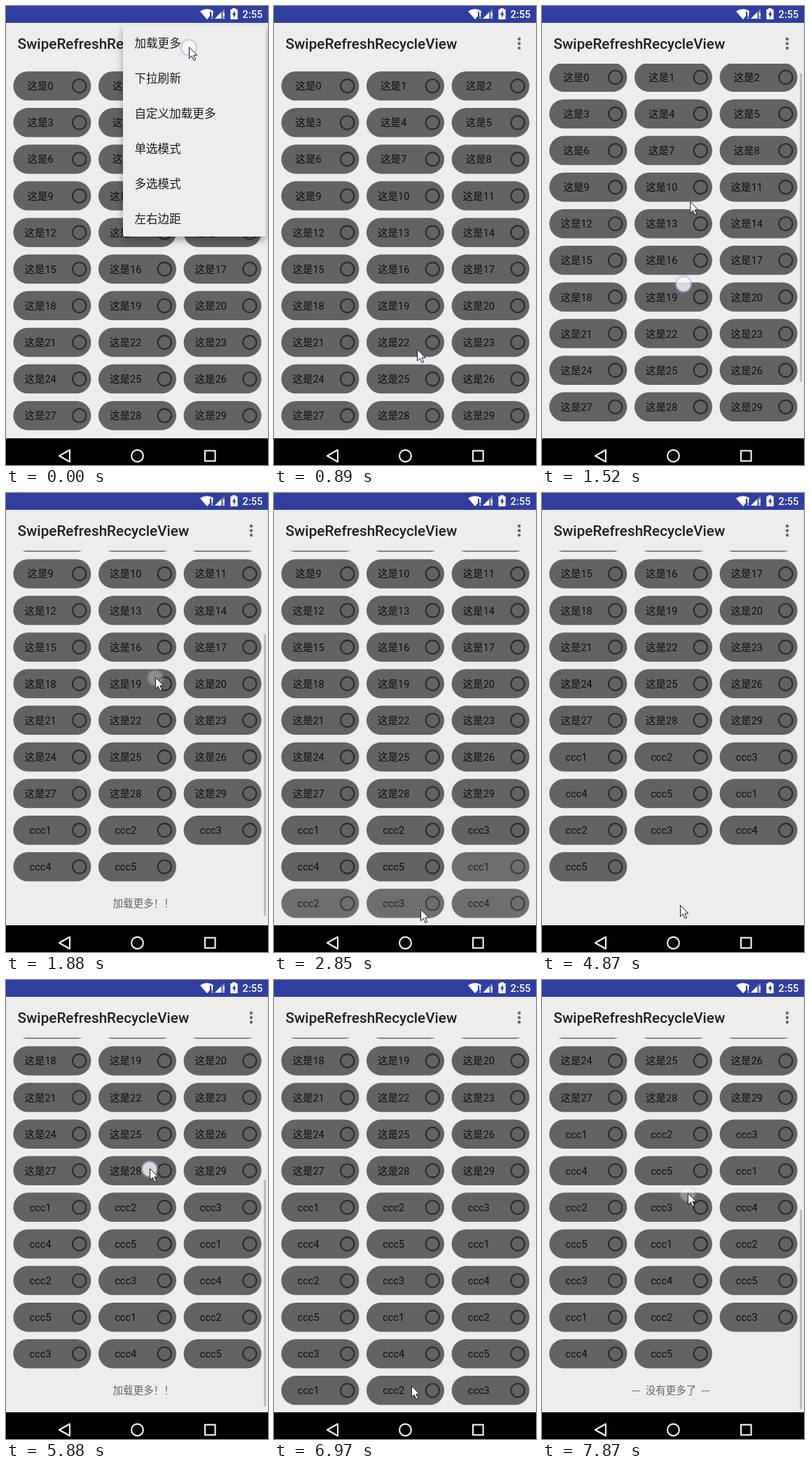
An HTML page for the animation above (8000 ms loop, 374 by 653 pixels).

```html
<!DOCTYPE html>
<html lang="zh-CN">
<head>
<meta charset="utf-8">
<title>SwipeRefreshRecycleView</title>
<style>
html, body { margin: 0; width: 100%; height: 100%; overflow: hidden; background: #ededed; }
svg { display: block; width: 374px; height: 653px; font: 14.54px Roboto, "Noto Sans CJK SC", "Noto Sans CJK", sans-serif; }
</style>
</head>
<body>
<svg viewBox="0 0 374 653" xmlns="http://www.w3.org/2000/svg">
  <defs>
    <clipPath id="view"><rect y="82" width="374" height="533"/></clipPath>
    <radialGradient id="glow">
      <stop offset="0" stop-color="#fff" stop-opacity=".72"/>
      <stop offset=".7" stop-color="#fafafa" stop-opacity=".8"/>
      <stop offset=".82" stop-color="#b9b8da" stop-opacity=".7"/>
      <stop offset="1" stop-color="#a4a3cc" stop-opacity="0"/>
    </radialGradient>
    <filter id="shade" x="-10%" y="-10%" width="120%" height="120%">
      <feDropShadow dx="0" dy="5" stdDeviation="5.5" flood-opacity=".34"/>
    </filter>
  </defs>
  <rect width="374" height="653" fill="#ededed"/>
  <g clip-path="url(#view)">
    <g id="list"></g>
    <g id="footer" fill="#666">
      <text id="note" y="26.3"></text>
      <path id="spin" fill="none" stroke="#777" stroke-width="1.6"/>
    </g>
    <rect id="bar" x="368" width="3.2" fill="#000" fill-opacity=".2"/>
  </g>
  <text x="16.5" y="61.3" font-size="20.7" font-weight="500" fill="#1f1f1f">SwipeRefreshRecycleView</text>
  <g fill="#666"><circle cx="350" cy="46.9" r="2.2"/><circle cx="350" cy="53.4" r="2.2"/><circle cx="350" cy="59.9" r="2.2"/></g>
  <g id="menu">
    <rect x="167" y="28" width="204" height="300" rx="2" fill="#ededed" filter="url(#shade)"/>
  </g>
  <rect width="374" height="24" fill="#303f9f"/>
  <g fill="#fff">
    <path d="M277 7.5Q287 1 296.5 7.5L293 12V8H291V14.5L287 19Z"/>
    <path d="M293.4 9h1.8v6h-1.8zM293.4 16.3h1.8v1.8h-1.8z"/>
    <path d="M312 4V18H298Z" opacity=".35"/>
    <path d="M307 9V18H298ZM310 9h1.8v6H310zM310 16.3h1.8v1.8H310z"/>
    <path d="M323 4.8V3.3h5v1.5h2.6V19H320.4V4.8Z"/>
    <text x="337.6" y="17" font-size="14.6" font-weight="500">2:55</text>
  </g>
  <path d="M326.6 6.5L322.8 12.6H325V17L328.4 10.8H326.6Z" fill="#303f9f"/>
  <rect y="615" width="374" height="38" fill="#000"/>
  <g fill="none" stroke="#f2f2f2" stroke-width="2.1">
    <path d="M76 640L91 631.5V648.5Z" stroke-linejoin="round"/>
    <circle cx="187.5" cy="640" r="8.4"/>
    <rect x="284" y="632.7" width="14.6" height="14.6"/>
  </g>
  <circle id="touch" r="13" fill="url(#glow)"/>
  <path id="cursor" d="M.5 .5V16.6L4.2 13.1L7 19.3L9.6 18.2L6.9 12.1H11.8Z" fill="#fff" stroke="#15152a"/>
</svg>
<script>
const LOOP = 8000, PITCH = 52.1, TOP = 93, FIRST = 30, BATCH = 5;
const $ = id => document.getElementById(id);
const set = (id, attrs) => { for (const k in attrs) $(id).setAttribute(k, attrs[k]); };
const clamp = v => Math.max(0, Math.min(1, v));
const ramp = (t, a, b) => clamp((t - a) / (b - a));
const ease = k => k * k * (3 - 2 * k);
const mix = (a, b, k) => a + (b - a) * k;

// Each gesture drags from one point to another and leaves the list at `end`.
const lastRow = rows => TOP + (rows - 1) * PITCH - 511;
const swipes = [
  { t: -530, from: [261, 58], to: [261, 58], end: 0 },
  { t: 1250, from: [202, 504], to: [213, 262], end: lastRow(12) },
  { t: 3300, from: [209, 592], to: [225, 285], end: lastRow(14) },
  { t: 5410, from: [197, 586], to: [205, 268], end: lastRow(15) },
  { t: 7250, from: [196, 577], to: [208, 303], end: lastRow(17) }
];
const drags = swipes.slice(1);
const loads = [1540, 2580, 4860, 6610];

function add(parent, tag, attrs, text) {
  const el = document.createElementNS('http://www.w3.org/2000/svg', tag);
  for (const k in attrs) el.setAttribute(k, attrs[k]);
  if (text) el.textContent = text;
  parent.appendChild(el);
  return el;
}

const pills = Array.from({ length: FIRST + loads.length * BATCH }, (_, i) => {
  const g = add($('list'), 'g', {
    transform: `translate(${10.4 + i % 3 * 121.6} ${TOP + Math.floor(i / 3) * PITCH})`
  });
  add(g, 'rect', { width: 111, height: 41.5, rx: 20.75, fill: '#636363' });
  add(g, 'circle', { cx: 94.3, cy: 20.8, r: 9.6, fill: 'none', stroke: '#2b2b2b', 'stroke-width': 2.1 });
  add(g, 'text', { x: 38.7, y: 26.3, 'text-anchor': 'middle', fill: '#0c0c0c' },
    i < FIRST ? '这是' + i : 'ccc' + (i % BATCH + 1));
  return g;
});

['加载更多', '下拉刷新', '自定义加载更多', '单选模式', '多选模式', '左右边距'].forEach((s, i) =>
  add($('menu'), 'text', { x: 183.4, y: 59 + i * 50, 'font-size': 16.6, fill: '#1c1c1c' }, s));

// Quick, slightly bowed drag up, then an eased move to where the next one begins.
function pointer(t) {
  const i = Math.max(0, swipes.filter(s => s.t <= t).length - 1);
  const { t: t0, from, to } = swipes[i];
  const next = swipes[i + 1] ? swipes[i + 1].from : to;
  const up = ramp(t, t0, t0 + 290), back = ease(ramp(t, t0 + 800, t0 + 1500));
  const [x, y] = from.map((v, j) => mix(mix(v, to[j], up), next[j], back));
  return [x - 5 * Math.sin(Math.PI * up), y];
}

function scroll(t) {
  return drags.reduce((sum, d, i) => {
    const dist = d.end - swipes[i].end, start = d.t + 197;
    return sum + dist * ease(ramp(t, start, start + 2.75 * dist));
  }, 0);
}

function spinner(t) {
  const a = t / 160, sweep = 2.2 + 2.2 * Math.sin(t / 210 + 2);
  const p = v => `${142 + 6.5 * Math.cos(v)} ${21 + 6.5 * Math.sin(v)}`;
  return `M${p(a)}A6.5 6.5 0 ${sweep > Math.PI ? 1 : 0} 1 ${p(a + sweep)}`;
}

function draw(t) {
  const stage = loads.filter(v => v <= t).length;
  const rows = Math.ceil((FIRST + stage * BATCH) / 3);
  const done = stage === loads.length;
  const s = scroll(t);

  set('list', { transform: `translate(0 ${-s})` });
  pills.slice(FIRST).forEach((g, i) => {
    const at = loads[Math.floor(i / BATCH)];
    g.setAttribute('opacity', ramp(t, at + 90, at + 290));
  });

  set('footer', { transform: `translate(0 ${TOP + rows * PITCH - s})` });
  set('note', { x: done ? 184 : 152.6, 'text-anchor': done ? 'middle' : 'start' });
  $('note').textContent = done ? '---\u00a0\u00a0没有更多了\u00a0\u00a0---' : '加载更多！！';
  set('spin', { d: done ? '' : spinner(t) });

  set('bar', {
    y: 85 + 0.9 * s / (1 + s / 760),
    height: 439 - 38.75 * stage,
    opacity: Math.max(...drags.map(d => t < d.t + 160 ? 0 : 1 - ramp(t, d.t + 850, d.t + 1100)))
  });

  set('menu', { opacity: 1 - ramp(t, 230, 470) });

  const [x, y] = pointer(t), [fx, fy] = pointer(t - 140);
  set('cursor', { transform: `translate(${x} ${y})` });
  set('touch', {
    transform: `translate(${fx} ${fy + 1})`,
    opacity: Math.max(...swipes.map(d =>
      ramp(t, d.t, d.t + 80) * (1 - ramp(t, d.t + 540, d.t + 680))))
  });
}

const start = performance.now();
function tick() {
  draw((performance.now() - start) % LOOP);
  requestAnimationFrame(tick);
}
draw(0);
requestAnimationFrame(tick);
</script>
</body>
</html>
```
